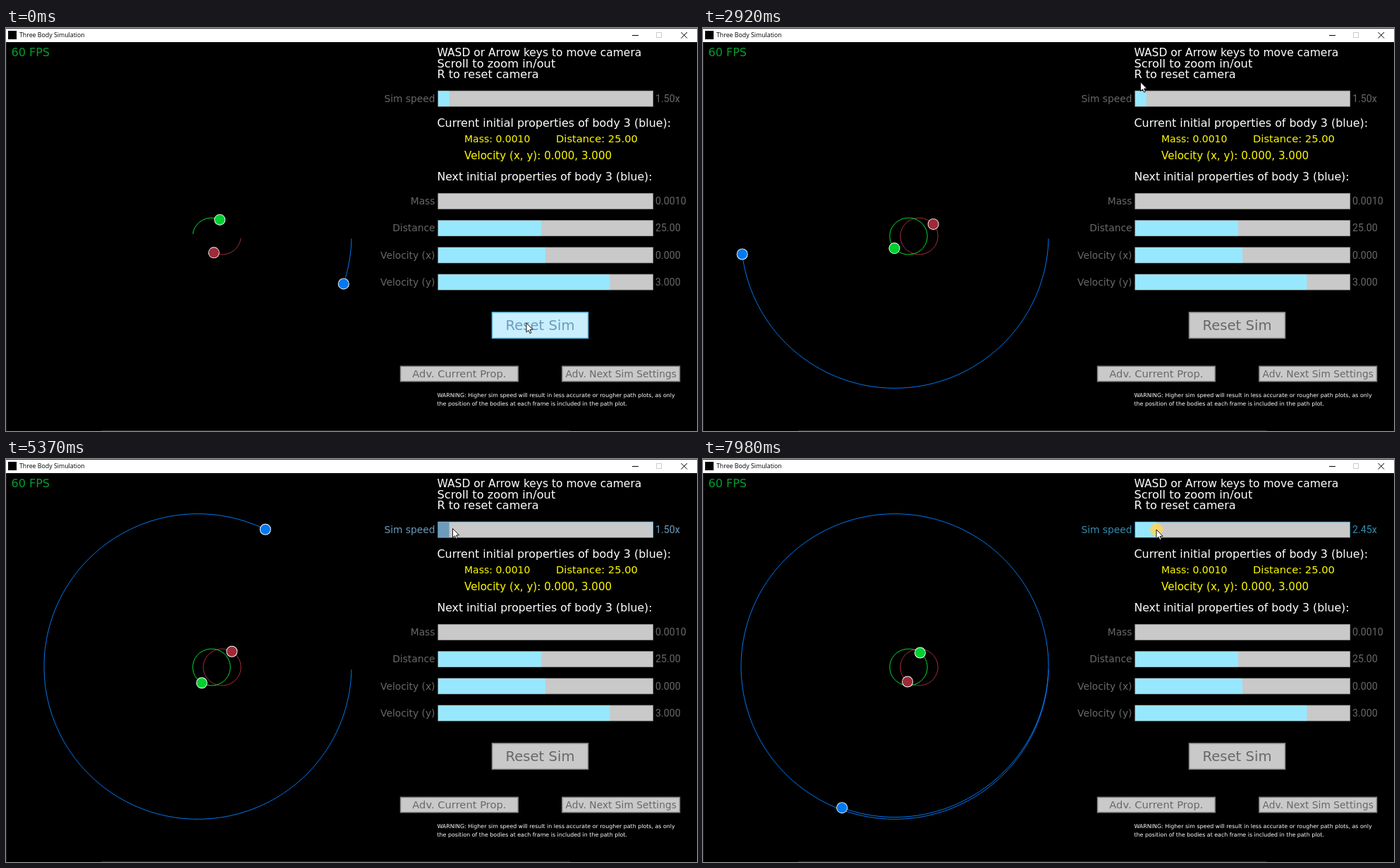
An HTML page with a canvas for the animation above (8 s loop, 980 by 571 pixels).

```html
<!DOCTYPE html>
<html lang="en">
<head>
<meta charset="utf-8">
<title>Three Body Simulation</title>
<style>
  html, body { margin: 0; width: 100%; height: 100%; overflow: hidden; background: #000; }
  canvas { display: block; width: 980px; height: 571px; }
</style>
</head>
<body>
<canvas id="stage" width="980" height="571"></canvas>
<script>
const ctx = document.getElementById('stage').getContext('2d');
const LOOP = 8000, TAU = Math.PI * 2, RAD = Math.PI / 180;
const UI = '"DejaVu Sans", sans-serif';
const NUM = 'Roboto, sans-serif';

// Widgets are laid out on a 1280 x 720 client area shown at this scale.
const SCALE = 0.7644, LEFT = 0.76, TOP = 19.9;

const STYLE = {
  normal: { border: '#838383', base: '#c9c9c9', text: '#686868', fill: '#97e8ff' },
  focus: { border: '#5bb2d9', base: '#c9effe', text: '#6c9bbc', fill: '#6c9bbc' },
  press: { border: '#0492c7', base: '#97e8ff', text: '#368baf', fill: '#97e8ff' }
};

// The simulation advances in 30 ms ticks, re-aligned at these moments.
const TICKS = [0, 860, 1060, 1110, 1690, 4120, 4950, 5760, 6280, 6580, 7410];
const PRESS_AT = 7350, DRAG_AT = 7395;

// [time, mean anomaly of the inner pair, of the outer body], in degrees
const PHASE = [[0, 130.4, 16.2], [1060, 593, 73.7], [2260, 1100.1, 136.6],
  [2920, 1388.3, 172.1], [4450, 2050.6, 253.8], [6280, 2840, 350.6],
  [7380, 3316.4, 410.5], [7980, 3740.6, 463.7]];
const PAIR_START = 8.5;

// [time, x, y] of the pointer tip
const POINTER = [[0, 738, 418], [2290, 738, 418], [2470, 618, 68], [2600, 616.5, 61],
  [2850, 620.5, 76.5], [3310, 620.5, 76.5], [3700, 633.5, 98.5],
  [7000, 633.5, 98.5], [7300, 643, 100]];

const PAIR = { y: 295, rx: 26.7, ry: 26, e: -0.28 };
const OUTER = { x: 272, y: 294, rx: 218, ry: 216.3, e: 0.124 };

function tick(t) {
  const from = TICKS.filter(a => a <= t).pop();
  return from + Math.floor((t - from) / 30) * 30;
}

function track(keys, t, ease = u => u) {
  const last = keys[keys.length - 1];
  if (t >= last[0]) return last.slice(1);
  const i = keys.findIndex(k => k[0] > t);
  const a = keys[i - 1], b = keys[i];
  const u = ease((t - a[0]) / (b[0] - a[0]));
  return a.slice(1).map((v, n) => v + (b[n + 1] - v) * u);
}

const smooth = u => u * u * (3 - 2 * u);

// Kepler's equation: mean anomaly (degrees) to eccentric anomaly (radians).
function eccentric(mean, e) {
  const m = mean * RAD;
  let E = m;
  for (let i = 0; i < 8; i++) E -= (E - e * Math.sin(E) - m) / (1 - e * Math.cos(E));
  return E;
}

function text(str, x, y, size, color, align = 'left', family = UI) {
  ctx.font = `${size}px ${family}`;
  ctx.textAlign = align;
  ctx.fillStyle = color;
  ctx.fillText(str, x, y);
}

function rect(x, y, w, h, color) {
  ctx.fillStyle = color;
  ctx.fillRect(x, y, w, h);
}

function line(points, color, width = 1) {
  ctx.beginPath();
  points.forEach(([x, y]) => ctx.lineTo(x, y));
  ctx.strokeStyle = color;
  ctx.lineWidth = width;
  ctx.stroke();
}

function disc(x, y, r, color) {
  ctx.beginPath();
  ctx.arc(x, y, r, 0, TAU);
  ctx.fillStyle = color;
  ctx.fill();
}

function body(x, y, color) {
  disc(x, y, 8, '#fff');
  disc(x, y, 7.1, color);
}

function titleBar() {
  rect(0, 0, 980, 20, '#fff');
  rect(0, 0, 980, 1, '#2b2b2b');
  rect(3, 4, 12, 12, '#000');
  text('Three Body Simulation', 19, 13.3, 8.8, '#000', 'left', '"Open Sans", sans-serif');
  line([[888, 10.5], [897, 10.5]], '#000');
  ctx.strokeStyle = '#ccc';
  ctx.strokeRect(922.5, 6.5, 7, 7);
  line([[957.5, 6], [966, 14.5]], '#000');
  line([[966, 6], [957.5, 14.5]], '#000');
}

function pairTrail(cx, from, to, color) {
  ctx.beginPath();
  ctx.ellipse(cx, PAIR.y, PAIR.rx, PAIR.ry, 0, from, Math.min(to, from + TAU));
  ctx.strokeStyle = color;
  ctx.lineWidth = 1;
  ctx.stroke();
}

// The outer orbit tightens slightly on its second lap.
function outerPoint(E) {
  const k = 1 - 0.013 * Math.min(1, Math.max(0, E - TAU));
  return [OUTER.x + OUTER.rx * k * Math.cos(E), OUTER.y + OUTER.ry * k * Math.sin(E)];
}

function orbits(t) {
  const [inner, outer] = track(PHASE, t);
  const E0 = eccentric(PAIR_START, PAIR.e), E = eccentric(inner, PAIR.e);
  pairTrail(306.5, E0, E, '#a82c3c');
  pairTrail(291.5, E0 + Math.PI, E + Math.PI, '#00dc30');

  const end = eccentric(outer, OUTER.e);
  const path = [];
  for (let a = 0.02; a < end; a += 0.02) path.push(outerPoint(a));
  path.push(outerPoint(end));
  line(path, '#0079f1');

  const dx = PAIR.rx * Math.cos(E), dy = PAIR.ry * Math.sin(E);
  body(306.5 + dx, PAIR.y + dy, '#9f2a37');
  body(291.5 - dx, PAIR.y - dy, '#00d030');
  body(...outerPoint(end), '#0079f1');
}

function place(x, y, w, h) {
  return { x: LEFT + x * SCALE, y: TOP + y * SCALE, w: w * SCALE, h: h * SCALE };
}

function stateOf(b, [px, py], pressed) {
  const inside = px >= b.x && px <= b.x + b.w && py >= b.y && py <= b.y + b.h;
  return STYLE[inside ? (pressed ? 'press' : 'focus') : 'normal'];
}

function frame(b, edge, border, base) {
  rect(b.x, b.y, b.w, b.h, border);
  rect(b.x + edge, b.y + edge, b.w - 2 * edge, b.h - 2 * edge, base);
}

function slider(label, value, y, part, tip, pressed) {
  const b = place(800, y, 400, 30), edge = SCALE;
  const s = stateOf(b, tip, pressed);
  frame(b, edge, s.border, '#c9c9c9');
  rect(b.x + edge, b.y + edge, (b.w - 2 * edge) * part, b.h - 2 * edge, s.fill);
  text(label, 608.5, b.y + 16.2, 13.8, s.text, 'right');
  text(value, 921, b.y + 16.2, 14.2, s.text, 'left', NUM);
}

function button(label, x, y, w, h, size, tip) {
  const b = place(x, y, w, h);
  const s = stateOf(b, tip);
  frame(b, 2 * SCALE, s.border, s.base);
  text(label, b.x + b.w / 2, b.y + b.h / 2 + size * 0.365, size, s.text, 'center');
}

function panel(t, tip) {
  const white = '#fff', yellow = '#fdf900';
  text('60 FPS', 7.5, 40, 16, '#009e2f');
  text('WASD or Arrow keys to move camera', 611.5, 40, 15.5, white);
  text('Scroll to zoom in/out', 611.5, 55.5, 16.3, white);
  text('R to reset camera', 611.5, 70.5, 16.1, white);
  text('Current initial properties of body 3 (blue):', 611.5, 139.5, 15.9, white);
  text('Mass: 0.0010', 650, 162, 14, yellow);
  text('Distance: 25.00', 780, 162, 14.7, yellow);
  text('Velocity (x, y): 0.000, 3.000', 650, 185.5, 15.1, yellow);
  text('Next initial properties of body 3 (blue):', 611.5, 216, 15.7, white);

  const speed = t >= DRAG_AT ? 2.45 : 1.5;
  slider('Sim speed', speed.toFixed(2) + 'x', 90, (speed - 0.5) / 19.5, tip, t >= PRESS_AT);
  slider('Mass', '0.0010', 280, 0, tip);
  slider('Distance', '25.00', 330, 0.48, tip);
  slider('Velocity (x)', '0.000', 380, 0.5, tip);
  slider('Velocity (y)', '3.000', 430, 0.8, tip);

  button('Reset Sim', 900, 500, 180, 50, 19.6, tip);
  button('Adv. Current Prop.', 730, 600, 220, 30, 14.7, tip);
  button('Adv. Next Sim Settings', 1030, 600, 220, 30, 13.8, tip);

  text('WARNING: Higher sim speed will result in less accurate or rougher path plots, as only',
    611.5, 523, 7.9, white);
  text('the position of the bodies at each frame is included in the path plot.',
    611.5, 534.5, 7.9, white);
}

function pointer([x, y]) {
  const shape = [[0, 0], [0, 13], [3, 10.3], [5, 14.6], [7, 13.7], [5.1, 9.5], [9, 9.3]];
  ctx.beginPath();
  shape.forEach(([dx, dy]) => ctx.lineTo(x + dx, y + dy));
  ctx.closePath();
  ctx.fillStyle = '#fff';
  ctx.fill();
  ctx.strokeStyle = '#000';
  ctx.lineWidth = 0.9;
  ctx.stroke();
}

function draw(now) {
  const t = tick(now % LOOP);
  const tip = track(POINTER, t, smooth);
  rect(0, 0, 980, 571, '#000');
  rect(0, 20, 1, 551, '#1c1c1c');
  rect(135, 570, 665, 1, '#2b2b2b');
  titleBar();
  orbits(t);
  panel(t, tip);
  if (t >= PRESS_AT) disc(tip[0], tip[1], 9, 'rgba(255, 215, 85, 0.82)');
  pointer(tip);
}

function loop() {
  draw(performance.now());
  requestAnimationFrame(loop);
}
loop();
</script>
</body>
</html>
```
